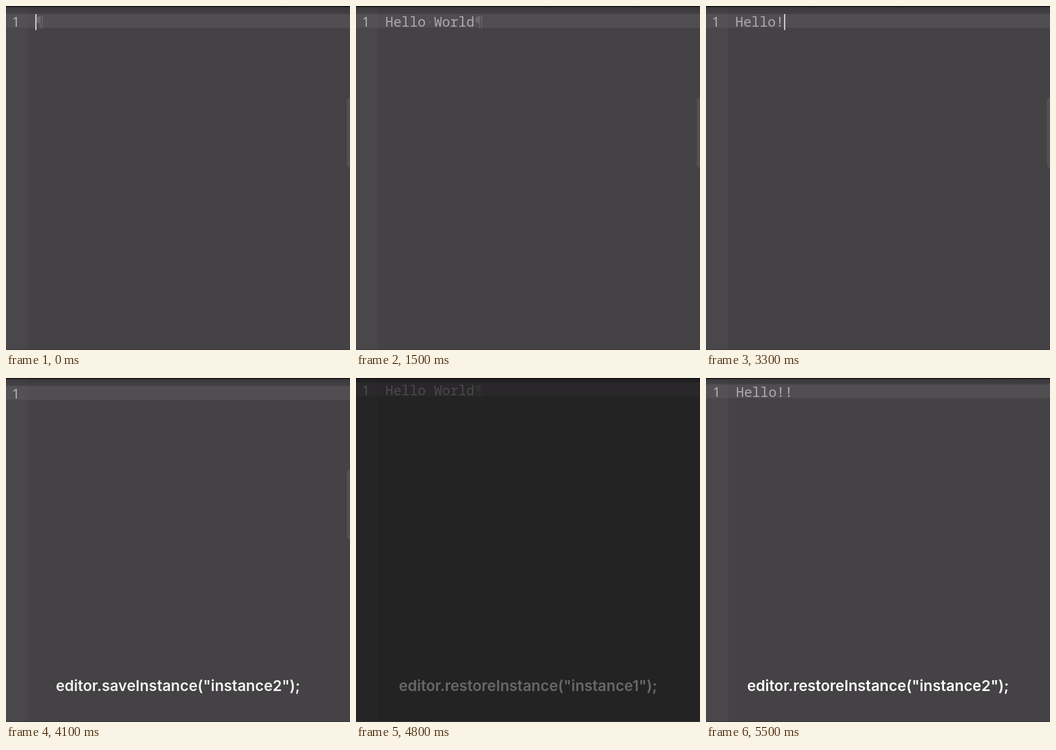
An HTML page for the animation above (6200 ms loop, 600x600 px).

```html
<!DOCTYPE html>
<html lang="en">
<head>
<meta charset="utf-8">
<title>Editor instances</title>
<style>
  html, body { margin: 0; width: 100%; height: 100%; overflow: hidden; background: #444244; }
  svg { display: block; width: 100vw; height: 100vh; }
  text { white-space: pre; }
  .code { font: 23.6px "Noto Sans Mono", "DejaVu Sans Mono", monospace; fill: #aeabae; }
  .number { font: 23.6px "Noto Sans", "Open Sans", sans-serif; fill: #b2afb2; }
  .faint { fill: #6b696b; }
  #caption { font: 600 26px Inter, Roboto, sans-serif; fill: #fff; text-anchor: middle; }
</style>
</head>
<body>
<svg viewBox="0 0 600 600">
  <defs>
    <linearGradient id="shade" x1="0" y1="0" x2="0" y2="1">
      <stop offset="0" stop-color="#232123" stop-opacity=".75"/>
      <stop offset=".3" stop-color="#353335" stop-opacity=".55"/>
      <stop offset="1" stop-color="#403e40" stop-opacity=".5"/>
    </linearGradient>
    <linearGradient id="edge">
      <stop offset="0" stop-color="#494749"/>
      <stop offset=".94" stop-color="#494749"/>
      <stop offset="1" stop-color="#444244"/>
    </linearGradient>
  </defs>
  <rect width="600" height="600" fill="#444244"/>
  <g id="page">
    <rect x="-2" y="-10" width="41" height="630" fill="url(#edge)"/>
    <rect x="-2" y="14" width="604" height="24" fill="#504e50"/>
    <rect x="-2" y="14" width="39" height="24" fill="#535153"/>
    <text class="number" x="10.5" y="36">1</text>
    <text class="code" id="line" x="51" y="36"></text>
    <text class="code faint" id="dot" y="36">·</text>
    <text class="code faint" id="mark" y="36">¶</text>
    <rect id="caret" y="14" width="2" height="28" fill="#dedcde"/>
  </g>
  <rect id="handle" x="594.5" y="160" width="20" height="122" rx="5" fill="#525152"/>
  <rect id="shadow" width="600" height="13" fill="url(#shade)"/>
  <text id="caption" x="300" y="546"></text>
  <rect id="veil" width="600" height="600" fill="#131213"/>
  <rect width="600" height="1.3" fill="#0a090a"/>
  <rect y="599" width="600" height="1" fill="#363436"/>
</svg>
<script>
const LOOP = 6200, TICK = 100, LEFT = 51, PITCH = 14.16;
const $ = id => document.getElementById(id);
const put = (id, attrs) => {
  for (const k in attrs) $(id).setAttribute(k, attrs[k]);
};

// [time, text, caret shown]
const TYPING = [
  [0, "", 1], [300, "H", 1], [400, "He", 1], [500, "Hel", 1], [600, "Hell", 1],
  [700, "Hello", 1], [800, "Hello ", 1], [1100, "Hello Wor", 1],
  [1300, "Hello Worl", 1], [1400, "Hello World", 1], [1500, "Hello World", 0],
  [1700, "Hello World", 1], [2000, "", 0], [2500, "", 1],
  [2700, "H", 1], [2800, "He", 1], [2900, "Hel", 1], [3000, "Hell", 1],
  [3200, "Hello", 1], [3300, "Hello!", 1], [3400, "Hello!!", 1],
  [3500, "Hello!!", 0], [3700, "Hello!!", 1], [4000, "", 0],
  [4700, "Hello World", 0], [5500, "Hello!!", 0]
];

// [start, end, call, fades in and out by itself]
const CAPTIONS = [
  [1900, 2500, 'editor.saveInstance("instance1");', true],
  [3900, 4500, 'editor.saveInstance("instance2");', true],
  [4700, 5500, 'editor.restoreInstance("instance1");', false],
  [5500, 6200, 'editor.restoreInstance("instance2");', false]
];

const FADE = [.3, .65, .94, 1, .7, .35];
const REVEAL = [.1, .36, .64, .9];

function draw(now) {
  const step = Math.floor((now % LOOP) / TICK);
  const t = step * TICK;

  const [, text, caretOn] = TYPING.findLast(s => s[0] <= t);
  const end = LEFT + text.length * PITCH;
  $("line").textContent = text;
  put("caret", { x: end + .2, opacity: caretOn });

  const marked = t < 2000 || (t >= 4700 && t < 5500);
  put("mark", { x: end + .5, opacity: marked ? 1 : 0 });
  put("dot", { x: LEFT + 5 * PITCH, opacity: marked && text.length > 5 ? .8 : 0 });

  const cap = CAPTIONS.find(c => t >= c[0] && t < c[1]);
  $("caption").textContent = cap ? cap[2] : "";
  put("caption", { opacity: cap && cap[3] ? FADE[(t - cap[0]) / TICK] : 1 });

  const restored = t >= 4700;
  const shown = restored ? REVEAL[(t - 4700) / TICK] ?? 1 : 1;
  put("veil", { opacity: 1 - shown });
  put("handle", { opacity: restored ? 0 : 1 });
  put("shadow", { height: t >= 5500 ? 11 : restored ? 8 : 13 });
  put("page", {
    transform: t >= 5500 ? "translate(1.3 -2.7)" : restored ? "translate(0 -6)" : ""
  });
}

let start = null;
function loop(now) {
  start ??= now;
  draw(Math.max(0, now - start));
  requestAnimationFrame(loop);
}
draw(0);
requestAnimationFrame(loop);
</script>
</body>
</html>
```
